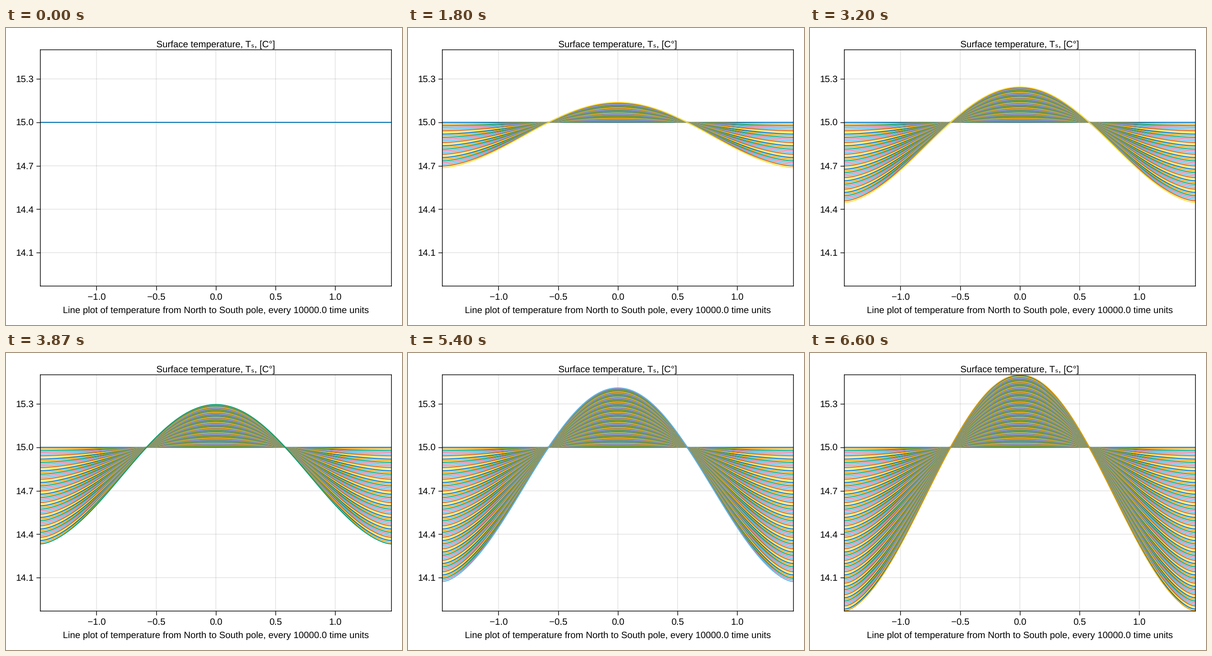
Write a matplotlib script that moves like this. It is 864 px wide and 648 px high and loops after 6.67 s.

```python
import matplotlib.pyplot as plt
import numpy as np
from matplotlib.animation import FuncAnimation
from matplotlib.collections import LineCollection

U = 1.44  # pixels per layout unit
W, H = 600 * U, 450 * U
LEFT, RIGHT, TOP, BOTTOM = 52 * U, 584 * U, 33 * U, 391 * U

CURVES, STEP = 100, 200 / 3  # one new curve every STEP ms
TICK, LOOP = 29, 6670
COLORS = ["#0072B2", "#E69F00", "#009E73", "#CC79A7",
          "#56B4E9", "#D55E00", "#F0E442"]

XMAX = np.pi / 2 - 0.1
Y0, PX_PER_DEG = 205.9, 315.83
YMIN = 15 - (BOTTOM - Y0) / PX_PER_DEG
YMAX = 15 + (Y0 - TOP) / PX_PER_DEG
PEAK, DIP = 0.5003, -1.1288
EDGE = 0.04  # width of the zero-flux layer at the poles

plt.rcParams.update({
    "font.family": ["Liberation Sans", "DejaVu Sans"],
    "font.size": 14 * U,
    "text.hinting": "none",
    "path.snap": False,
})


def profile(x):
    """Final anomaly: warm equator, cold poles, flat at both ends."""
    slope = 2 * np.sin(2 * XMAX)

    def shape(u):
        return np.cos(2 * u) + slope * EDGE * np.exp((np.abs(u) - XMAX) / EDGE)

    lo, hi = shape(XMAX), shape(0.0)
    return DIP + (PEAK - DIP) * (shape(x) - lo) / (hi - lo)


def growth(n):
    """Almost linear warming, slowing down slightly."""
    def raw(k):
        return k * (1 - 1.9e-4 * k)
    return raw(n) / raw(CURVES - 1)


# At 72 dpi one point is one pixel.
fig = plt.figure(figsize=(W / 72, H / 72), dpi=72, facecolor="white")
ax = fig.add_axes([LEFT / W, 1 - BOTTOM / H,
                   (RIGHT - LEFT) / W, (BOTTOM - TOP) / H])
ax.set_xlim(-XMAX, XMAX)
ax.set_ylim(YMIN, YMAX)
ax.set_axisbelow(True)
ax.grid(color="black", alpha=0.12, linewidth=U)
for spine in ax.spines.values():
    spine.set_linewidth(U)


def label(x, y, text, ha="center"):
    fig.text(x / W, 1 - y / H, text, ha=ha, va="baseline", color="black")


xticks = [-1.0, -0.5, 0.0, 0.5, 1.0]
yticks = [14.1, 14.4, 14.7, 15.0, 15.3]
ax.set_xticks(xticks, [])
ax.set_yticks(yticks, [])
ax.tick_params(length=6 * U, width=U, color="black")

mid = (LEFT + RIGHT) / 2
for t in xticks:
    label(mid + t * (RIGHT - LEFT) / (2 * XMAX), 594.2,
          f"{t:.1f}".replace("-", "\u2212"))
for t in yticks:
    label(42 * U, Y0 - (t - 15) * PX_PER_DEG + 7.2, f"{t:.1f}", ha="right")
label(mid, 42.2, "Surface temperature, T\u209b, [C\u00b0]")
label(mid, 621.7, "Line plot of temperature from North to South pole, "
                  "every 10000.0 time units")

x = np.linspace(-XMAX, XMAX, 121)
anomaly = profile(x)
curves = [np.column_stack([x, 15 + growth(n) * anomaly])
          for n in range(CURVES)]
bundle = LineCollection([], colors=COLORS, linewidths=1.5 * U, zorder=2)
ax.add_collection(bundle, autolim=False)


def draw(i):
    # A curve appears in the tick that contains its start, rounded to 10 ms.
    n = min(int(((i + 1) * TICK + 3) / STEP), CURVES - 1)
    bundle.set_segments(curves[:n + 1])
    return [bundle]


anim = FuncAnimation(fig, draw, frames=LOOP // TICK, init_func=lambda: draw(0),
                     interval=TICK, repeat=True, repeat_delay=0)
plt.show()
```
